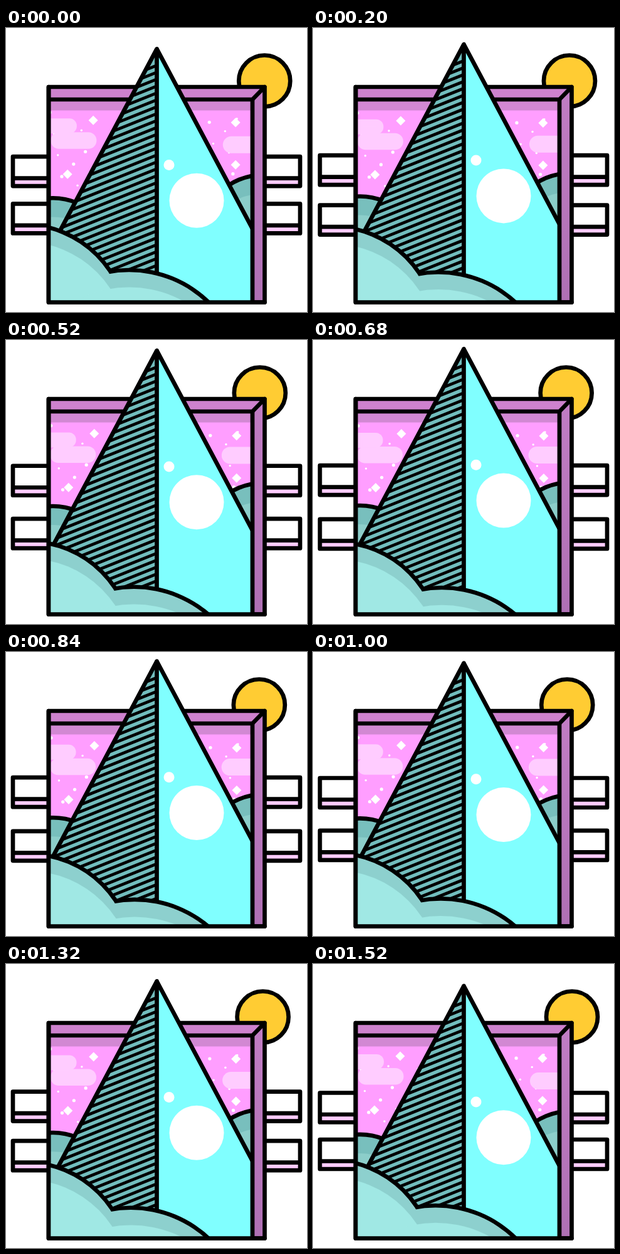
An HTML page for the animation above (1.56 s loop, 480x453 px).

```html
<!DOCTYPE html>
<html lang="en">
<head>
<meta charset="utf-8">
<title>Pyramid</title>
<style>
  html, body { margin: 0; width: 100%; height: 100%; overflow: hidden; background: #fff; }
  svg { display: block; width: 100vw; height: 100vh; }
  .line { fill: none; stroke: #000; stroke-width: 6.7; stroke-linejoin: round; stroke-linecap: round; }
</style>
</head>
<body>
<svg viewBox="0 0 480 453">
  <defs>
    <clipPath id="window"><rect x="68" y="114" width="325" height="323.5"/></clipPath>
    <clipPath id="scene"><rect x="68" y="0" width="325" height="437.5"/></clipPath>
    <clipPath id="leftFace"><path d="M240.5 14V460H3.3Z"/></clipPath>
    <linearGradient id="side" x1="0" y1="0" x2="0" y2="1">
      <stop offset="0" stop-color="#c17dc4"/>
      <stop offset="1" stop-color="#af70b4"/>
    </linearGradient>
    <g id="shelf">
      <rect width="458" height="47" fill="#fff"/>
      <rect y="34.5" width="458" height="12.5" fill="#fcf"/>
      <path class="line" d="M0 0H458V47H0ZM0 34.5H458"/>
    </g>
  </defs>

  <g data-move="9.5 0">
    <circle class="line" cx="403.5" cy="84.5" r="41" style="fill:#fc3"/>
  </g>
  <g data-move="0 5.5"><use href="#shelf" x="11" y="200"/></g>
  <g data-move="0 -6"><use href="#shelf" x="11" y="286"/></g>

  <rect x="68" y="94" width="344.5" height="343.5" fill="#ce82ce"/>
  <path d="M412.5 94V437.5H393V114Z" fill="url(#side)"/>

  <g clip-path="url(#window)">
    <rect x="68" y="114" width="325" height="324" fill="#ff9eff"/>
    <rect x="68" y="114" width="325" height="17.5" fill="#d288d3"/>
    <g id="stars" data-move="-2 -2.5" fill="#fff"></g>
    <g data-move="1.5 -4" fill="#fcf">
      <rect x="30" y="148" width="81.5" height="24" rx="11.5"/>
      <rect x="70" y="170" width="73" height="26.5" rx="13"/>
      <rect x="78" y="160" width="22" height="12"/>
    </g>
    <g data-move="2.5 3" fill="#fcf">
      <rect x="343.5" y="170" width="90" height="27" rx="13.5"/>
    </g>
    <g id="backHills" data-move="0 8"></g>
  </g>

  <path class="line" d="M68 94H412.5V437.5H68ZM68 114H393L412.5 94"/>

  <g clip-path="url(#scene)">
    <g data-move="0 21">
      <path d="M240.5 14L477.7 460H240.5Z" fill="#80ffff"/>
      <circle cx="304" cy="255.8" r="43.5" fill="#fff"/>
      <circle cx="260" cy="199" r="8.5" fill="#fff"/>
      <path d="M240.5 14V460H3.3Z" fill="#72bdbd"/>
      <g clip-path="url(#leftFace)"><path id="stripes" stroke="#000" stroke-width="4.8"/></g>
      <path class="line" d="M240.5 460V14L3.3 460M240.5 14L477.7 460"/>
    </g>
    <g id="frontHills" data-move="-10 -10"></g>
  </g>

  <path class="line" d="M68 94V437.5H412.5M393 114V437.5"/>
</svg>
<script>
const LOOP = 1560, STEP = 40, TOP_AT = 740;
const $ = id => document.getElementById(id);
const range = n => [...Array(n).keys()];

const circle = (x, y, r) => `<circle cx="${x}" cy="${y}" r="${r}"/>`;
const diamond = (x, y, r) => `<path d="M${x} ${y - r}l${r} ${r}l${-r} ${r}l${-r} ${-r}z"/>`;

// Merged discs: black rim, shaded band, light core
function hills(discs, drop, shade, light) {
  const layer = (dy, grow, fill) =>
    `<g fill="${fill}">${discs.map(([x, y, r]) => circle(x, y + dy, r + grow)).join('')}</g>`;
  return layer(0, 3.4, '#000') + layer(0, -3.2, shade) + layer(drop, 0, light);
}
$('backHills').innerHTML = hills([[75, 364, 100], [410, 327, 100]], 30, '#78bfbd', '#8cceca');
$('frontHills').innerHTML = hills([[36.5, 489, 166.5], [205.5, 577.3, 182]], 27.5, '#8dd0ce', '#a0e8e4');

// Even scatter of dots over the sky, every third one large
const dots = range(44).map(i =>
  circle(72 + 320 * (i * .7549 % 1), 137 + 122 * (i * .5698 % 1), i % 3 ? 1.7 : 2.6));
const gems = [[141, 149.5], [100, 235.5], [368, 153], [368, 220.5]].map(([x, y]) => diamond(x, y, 7.5));
$('stars').innerHTML = [...dots, ...gems].join('');

$('stripes').setAttribute('d', range(46).map(i => `M241 ${40 + i * 11}l-240 96`).join(''));

// Ease-in curve: cubic-bezier(.35, 0, 1, 1)
function easeIn(x) {
  let lo = 0, hi = 1;
  for (let i = 0; i < 24; i++) {
    const s = (lo + hi) / 2, u = 1 - s;
    if (3 * u * u * s * .35 + 3 * u * s * s + s ** 3 < x) lo = s; else hi = s;
  }
  return 3 * (1 - lo) * lo * lo + lo ** 3;
}

const movers = [...document.querySelectorAll('[data-move]')]
  .map(el => [el, ...el.dataset.move.split(' ').map(Number)]);

function draw() {
  const t = Math.floor(performance.now() % LOOP / STEP) * STEP;
  const q = easeIn(Math.abs(t - TOP_AT) / (LOOP / 2));
  for (const [el, x, y] of movers) el.setAttribute('transform', `translate(${x * q} ${y * q})`);
  requestAnimationFrame(draw);
}
draw();
</script>
</body>
</html>
```
